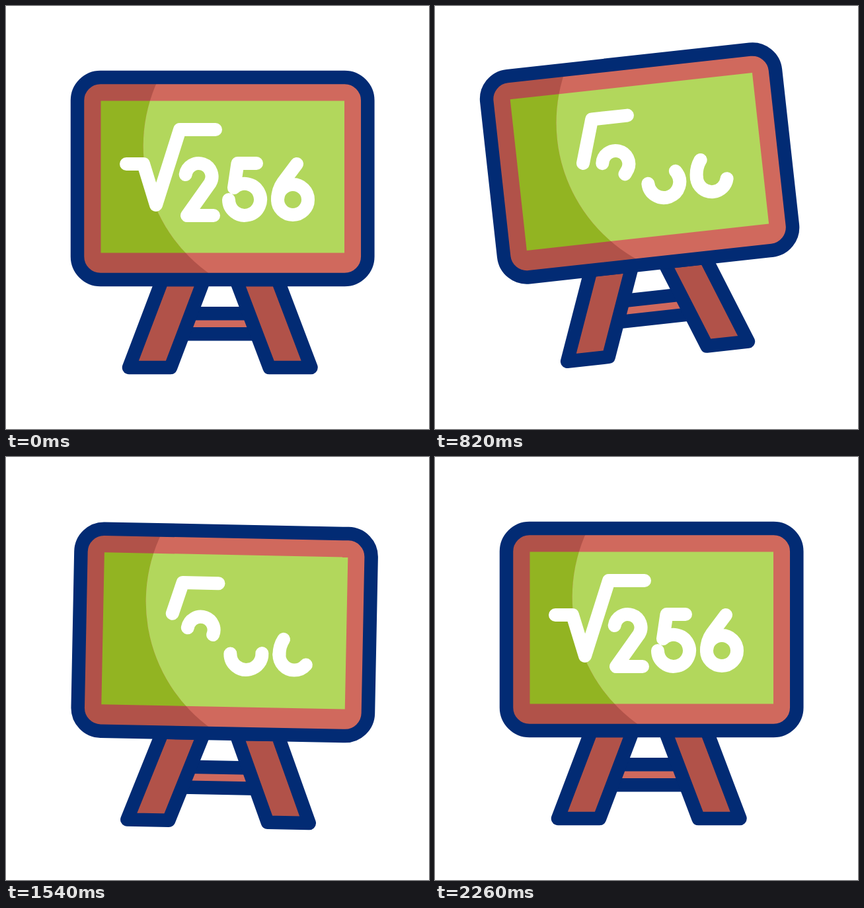
Write an HTML page that moves like this. It is 640 px wide and 640 px high and loops after 2.4 s.

```html
<!DOCTYPE html>
<html lang="en">
<head>
<meta charset="utf-8">
<title>Blackboard</title>
<style>
  html, body { margin: 0; height: 100%; overflow: hidden; background: #fff; }
  svg { display: block; width: 100vw; height: 100vh; }
  .line { stroke: #022b74; stroke-width: 20.5; stroke-linejoin: round; }
  .red { fill: #d0695d; }
  .dark-red { fill: #b15249; }
  .green { fill: #b2d75c; }
  .dark-green { fill: #92b422; }
  #chalk { fill: none; stroke: #fff; stroke-width: 20; stroke-linecap: round; stroke-linejoin: round; }
</style>
</head>
<body>
<svg viewBox="0 0 640 640">
  <defs>
    <clipPath id="light"><circle cx="444" cy="212" r="236.3"/></clipPath>
    <rect id="frame" x="108" y="108" width="439.3" height="306" rx="35"/>
    <rect id="panel" x="143.5" y="143.5" width="368.5" height="230"/>
  </defs>
  <g id="easel">
    <rect class="line red" x="255" y="465.3" width="137" height="31"/>
    <path class="line dark-red" d="M186 547H249L299.5 414H236.5ZM398.5 547H461.5L411 414H348Z"/>
    <use href="#frame" class="dark-red"/>
    <use href="#panel" class="dark-green"/>
    <g clip-path="url(#light)">
      <use href="#frame" class="red"/>
      <use href="#panel" class="green"/>
    </g>
    <use href="#frame" class="line" fill="none"/>
    <g id="chalk">
      <path pathLength="1" d="M317 187H263L227 301L208 239H182"/>
      <path pathLength="1" d="M271.7 255A20 20 0 1 1 308.8 268L274 317H314"/>
      <path pathLength="1" d="M337 293A24 24 0 1 0 345 275L350.5 238H379"/>
      <path pathLength="1" d="M411 293C411 281 414 274 419 267L440 239"/>
      <path pathLength="1" d="M411 293A23 23 0 0 0 457 293A23 23 0 0 0 411 293"/>
    </g>
  </g>
</svg>
<script>
  const LOOP = 2400;
  const easel = document.getElementById('easel');
  const chalk = document.getElementById('chalk');

  // Keys are [time in ms, value]
  const tilt = [[400, 0], [1000, -8], [1400, 2], [1800, -1], [2200, 0]];
  const drawn = [[400, 1], [1200, 0], [2000, 1]];

  function valueAt(keys, t) {
    let value = keys[0][1];
    for (let i = 1; i < keys.length; i++) {
      const [t0, v0] = keys[i - 1], [t1, v1] = keys[i];
      const x = Math.min(1, Math.max(0, (t - t0) / (t1 - t0)));
      value += (v1 - v0) * x * x * (3 - 2 * x);
    }
    return value;
  }

  function draw() {
    const t = performance.now() % LOOP;
    easel.setAttribute('transform', `rotate(${valueAt(tilt, t)} 109 414)`);
    const part = valueAt(drawn, t);
    chalk.setAttribute('stroke-dasharray', part > 0.9999 ? 'none' : `${part} 2`);
    requestAnimationFrame(draw);
  }
  draw();
</script>
</body>
</html>
```
